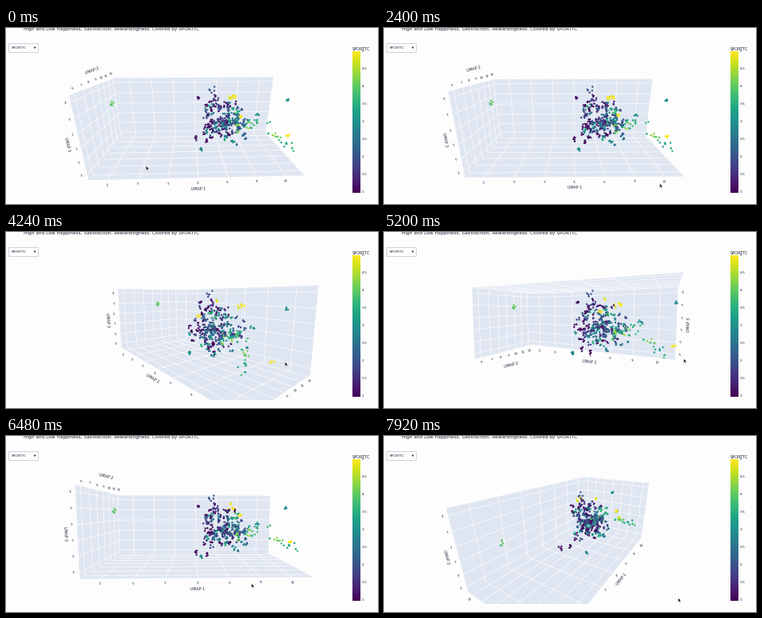
These frames come from a looping animation (466x220 px, 8000 ms). A matplotlib script:

```python
import numpy as np
import matplotlib.pyplot as plt
from matplotlib.animation import FuncAnimation
from matplotlib.collections import LineCollection, PolyCollection
from matplotlib.patches import Polygon, Rectangle

W, H, FRAMES, STEP = 466, 220, 100, 80
plt.rcParams["font.family"] = "DejaVu Sans"
INK, WALL, PAGE = "#1c2536", "#dfe6f1", "#fdfdfd"
CENTER, FOCAL, DIST = (238.5, 115), 241, 1.835
HALF = np.array([0.87, 0.4225, 0.34])
# unit length, offset, first and last value, value step
TICKS = [
    (0.24 * np.arange(-3, 4), range(-2, 11, 2)),
    (0.12 * np.arange(-3, 4), range(6, 13)),
    (-0.29 + 0.117 * np.arange(6), range(-1, 5)),
]

# Pointer way points: time, x, y, whether the button was held on the way there
GESTURE = np.array([
    (0, 177, 175, 0), (880, 175.3, 172.5, 1), (2400, 347, 197, 0),
    (2640, 407, 174, 0), (3520, 353, 180, 1), (3680, 353, 180, 1),
    (4240, 351, 165, 1), (5200, 377, 161, 1), (5840, 408, 161, 1),
    (6400, 309, 187, 0), (6480, 309, 187, 1), (7920, 370, 205, 1),
])
TIMES, POINTER, HELD = GESTURE[:, 0], GESTURE[:, 1:3], GESTURE[:, 3:]
# Held moves turn the camera, in degrees per pixel
TURNS = np.diff(POINTER, axis=0, prepend=POINTER[:1]) * HELD * (-0.9, 1)
CAMERA = (-2, 20) + np.cumsum(TURNS, axis=0)


def at(track, t):
    return np.array([np.interp(t, TIMES, column) for column in track.T])


def make_points():
    rng = np.random.default_rng(7)
    pts, vals = [], []

    def clump(pos, value, n=3, spread=0.009):
        pts.append(pos + rng.normal(0, spread, (n, 3)))
        vals.append(np.clip(value + rng.normal(0, 0.05, n), 0, 1))

    def streak(start, end, low, high, spread):
        for s in np.linspace(0, 1, 9):
            pos = (1 - s) * np.array(start) + s * np.array(end)
            clump(pos, rng.uniform(low, high), 2, spread)

    for _ in range(140):
        off = np.clip(rng.normal(0, 1, 3), -1.8, 1.8) * (0.11, 0.085, 0.1)
        clump((0.28, 0, -0.01) + off, np.clip(rng.beta(1.1, 2.7) + off[0], 0, 0.8))
    streak((0.13, 0.03, 0.3), (0.23, 0.03, 0.1), 0, 0.35, 0.012)
    streak((0.66, -0.14, -0.08), (0.8, -0.33, -0.14), 0.5, 0.8, 0.013)
    for _ in range(10):
        clump((0.5, -0.04, -0.04) + rng.normal(0, 0.05, 3), rng.uniform(0.4, 0.9), 2)
    for _ in range(4):
        clump((0.32, 0.12, 0.21) + rng.normal(0, 1, 3) * (0.1, 0.12, 0.02), 1)

    for *pos, value in [
        (-0.775, 0.01, 0.167, 0.75), (0.853, 0, 0.185, 0.5), (0.6, 0.03, 0.03, 0.5),
        (0, 0.17, -0.27, 0), (0.11, 0.13, -0.28, 0), (0.02, 0.03, 0.21, 0),
        (0.04, -0.12, -0.25, 0.5), (0.35, -0.28, 0.12, 1), (0.84, -0.13, -0.12, 1),
    ]:
        clump(pos, value, 5)
    return np.vstack(pts), np.concatenate(vals)


POINTS, VALUES = make_points()


def project(points, azimuth, elevation):
    x, y, z = np.asarray(points, float).T
    a, e = np.radians([azimuth, elevation])
    near = x * np.sin(a) - y * np.cos(a)
    right = x * np.cos(a) + y * np.sin(a)
    depth = DIST - near * np.cos(e) - z * np.sin(e)
    up = z * np.cos(e) - near * np.sin(e)
    scale = FOCAL / depth
    return np.c_[CENTER[0] + right * scale, CENTER[1] - up * scale], depth


def face(axis, sign):
    """Corners and grid segments of one side of the box."""
    u, v = [k for k in range(3) if k != axis]

    def point(pu, pv):
        p = np.zeros(3)
        p[axis], p[u], p[v] = sign * HALF[axis], pu, pv
        return p

    hu, hv = HALF[u], HALF[v]
    corners = [point(-hu, -hv), point(hu, -hv), point(hu, hv), point(-hu, hv)]
    grid = [(point(t, -hv), point(t, hv)) for t in TICKS[u][0]]
    grid += [(point(-hu, t), point(hu, t)) for t in TICKS[v][0]]
    return corners, grid


def axis_edges(azimuth, ceiling):
    """Signs of the two fixed coordinates for the x, y and z axis lines."""
    if ceiling:
        return (1, -1), (-1, -1), (1, 1)
    if azimuth < -6:
        return (-1, -1), (-1, -1), (-1, 1)
    if azimuth < 20:
        return (-1, -1), (-1, 1), (-1, -1)
    return (-1, -1), (1, -1), (-1, -1)


fig = plt.figure(figsize=(W / 100, H / 100), dpi=100, facecolor=PAGE)
ax = fig.add_axes([0, 0, 1, 1])
ax.axis("off")
scene = Rectangle((0, 9), 432, 201, transform=ax.transData)


def label(x, y, text, px, **kw):
    kw = {"color": INK, "va": "center", "ha": "center", **kw}
    return ax.text(x, y, text, fontsize=px * 0.72, **kw)


def draw_chrome():
    label(22, 3.2, "High and Low Happiness, Satisfaction, Rewardingness. Colored by SPORTTC",
          5.75, ha="left", va="baseline")
    ax.add_patch(Rectangle((2.5, 19.5), 37, 10.5, fc="white", ec="#c4cbd6", lw=0.6))
    label(7, 24.8, "SPORTTC", 4.2, ha="left")
    ax.add_patch(Polygon([(34.5, 23.6), (37.5, 23.6), (36, 26)], fc=INK, lw=0))
    label(433.5, 26, "SPORTTC", 5, ha="left")
    ax.imshow(np.linspace(1, 0, 256)[:, None], cmap="viridis", aspect="auto",
              extent=(434, 444, 206, 29.5))
    for k in range(9):
        label(445.3, 205.5 - 22 * k, f"{1 + k / 2:g}", 4.2, ha="left")
    ax.set(xlim=(0, W), ylim=(H, 0))


draw_chrome()
moving = []


def draw_axis(axis, signs, view):
    others = [k for k in range(3) if k != axis]
    ends = np.zeros((3, 3))
    for k, s in zip(others, signs):
        ends[:, k] = s * HALF[k]
    ends[:2, axis] = -HALF[axis], HALF[axis]
    line, _ = project(ends, *view)
    d = line[1] - line[0]
    normal = np.array([-d[1], d[0]]) / np.hypot(*d)
    if normal @ (line[2] - CENTER) < 0:
        normal = -normal
    angle = (90 - np.degrees(np.arctan2(d[1], d[0]))) % 180 - 90

    places, names = TICKS[axis]
    marks = np.repeat(ends[2:], len(places), axis=0)
    marks[:, axis] = places
    spots, _ = project(marks, *view)
    items = [(p + 6.5 * normal, str(n), 4, 20) for p, n in zip(spots, names)]
    items.append((line[2] + (14, 19, 16)[axis] * normal, f"UMAP {axis + 1}", 4.8, angle))
    for (x, y), text, px, turn in items:
        if 10 < y < 208 and 0 < x < 430:
            moving.append(label(x, y, text, px, rotation=turn, rotation_mode="anchor"))


def draw(frame):
    while moving:
        moving.pop().remove()
    t = frame * STEP
    view = azimuth, elevation = at(CAMERA, t)
    ceiling = elevation < 6 and azimuth > 5

    walls, lines = [], []
    for axis, sign in ((0, 1 if azimuth < -6 else -1), (1, 1), (2, 1 if ceiling else -1)):
        corners, grid = face(axis, sign)
        walls.append(project(corners, *view)[0])
        lines += [project(segment, *view)[0] for segment in grid]
    spots, depth = project(POINTS, *view)
    order = np.argsort(-depth)

    for artist in (
        PolyCollection(walls, facecolor=WALL, edgecolor=WALL, lw=0.3, zorder=1),
        LineCollection(lines, colors="white", lw=0.45, zorder=2),
    ):
        ax.add_collection(artist, autolim=False)
        artist.set_clip_path(scene)
        moving.append(artist)
    dots = ax.scatter(*spots[order].T, c=VALUES[order], cmap="viridis", vmin=0, vmax=1,
                      s=3.1, lw=0, zorder=3)
    dots.set_clip_path(scene)
    moving.append(dots)

    for axis, signs in enumerate(axis_edges(azimuth, ceiling)):
        draw_axis(axis, signs, view)

    arrow = np.array([(0, 0), (0, 5), (1.2, 4), (2, 5.8), (2.8, 5.4), (2, 3.7), (3.5, 3.5)])
    tip = at(POINTER, t) - (1.5, 2.5)
    moving.append(ax.add_patch(Polygon(arrow + tip, fc="black", ec="white", lw=0.25, zorder=6)))
    return moving


anim = FuncAnimation(fig, draw, frames=FRAMES, interval=STEP, repeat=True,
                     repeat_delay=0, blit=False)
plt.show()
```
